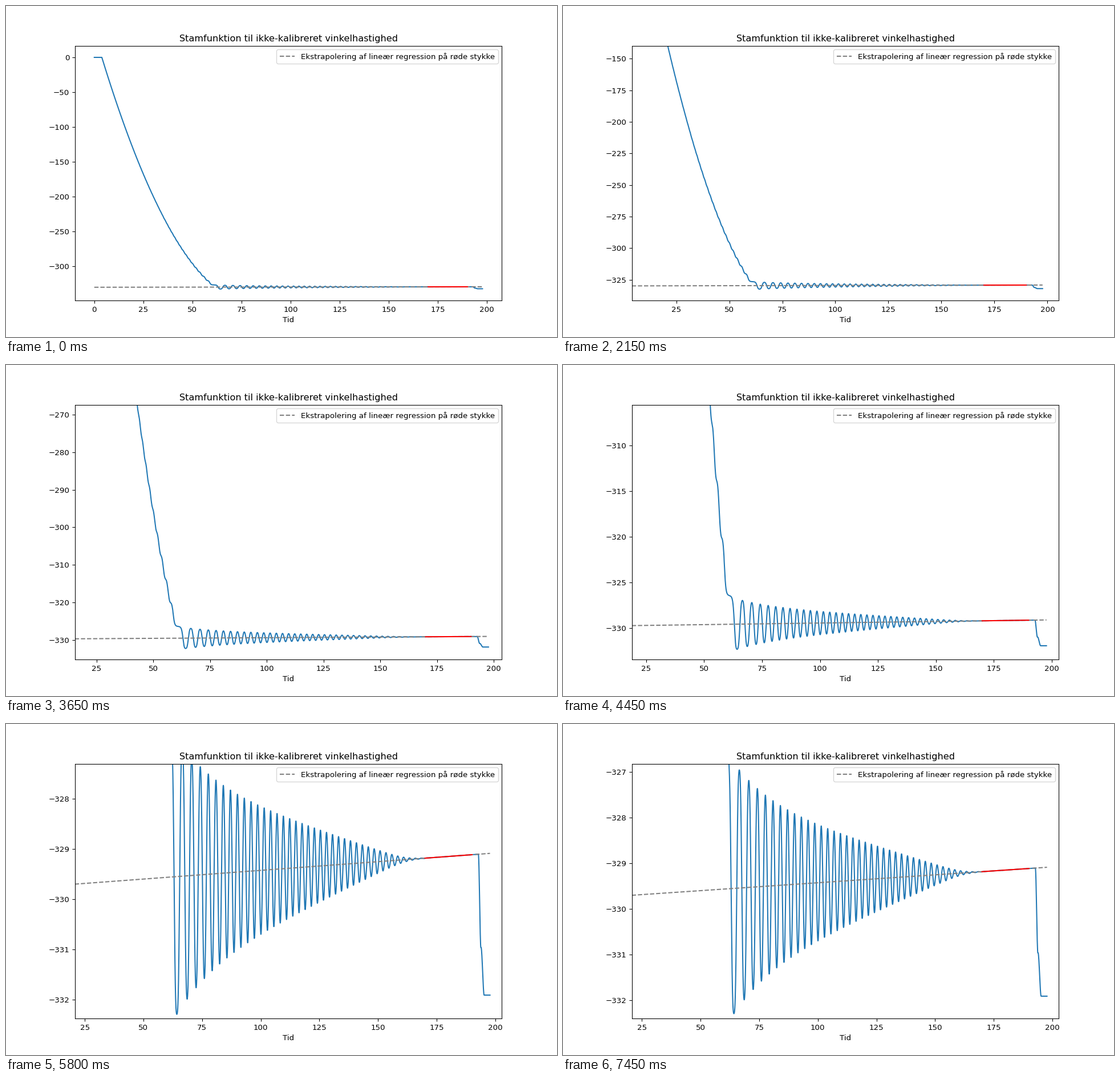
A matplotlib script for the animation above (8.25 s loop, 966 by 580 pixels).

```python
import numpy as np
import matplotlib.pyplot as plt
from matplotlib.animation import FuncAnimation

WIDTH, HEIGHT, DPI = 966, 580, 96.6
STEP_MS = 50
FRAMES = 165
LAST_MOVE = 149

RELEASE = 3.85       # wheel is let go
TURN_BACK = 64.3     # first reversal of direction
OMEGA = 2 * np.pi / 2.505  # small-swing angular frequency


def trend(t):
    return -329.773 + 0.00347 * t


def spin_down(t):
    """Wheel slowed by friction, with a wobble once per turn."""
    s = t - RELEASE
    mean = -(9.2 * s - 0.0604 * s ** 2)
    speed = 9.2 - 0.1208 * s
    wobble = np.minimum(0.8, 6.4 / speed ** 2)
    return mean - wobble * np.sin(mean + 326.4)


def slow_turn(tau):
    """One full turn that starts and ends at the unstable top point."""
    return 4 * np.arctan(np.exp(-OMEGA * tau))


def last_turn(t):
    return trend(t) - np.pi + slow_turn(t - 58.8) + slow_turn(t - 63.05)


def swing(t):
    """Large pendulum swings that die out, getting faster as they shrink."""
    left = 0.03 * np.log1p(np.exp((162 - t) / 3))
    amp = left * (1.91 + 0.0068 * np.exp(5 * left))
    slowing = ((1 + np.sqrt(np.cos(amp / 2))) / 2) ** 2
    phase = np.cumsum(OMEGA * slowing) * (t[1] - t[0])
    phase -= np.interp(TURN_BACK, t, phase) + np.pi
    # Third harmonic: flatter turning points, quicker passage in the middle.
    flat = (np.sinc(amp / (2 * np.pi)) / slowing - 1) / 4
    return trend(t) + amp * ((1 + flat) * np.cos(phase) - flat * np.cos(3 * phase))


def ramp(t, start, end):
    u = np.clip((t - start) / (end - start), 0, 1)
    return u * u * (3 - 2 * u)


def final_drop(t):
    return trend(192.8) - 1.86 * ramp(t, 192.75, 193.8) - 0.95 * ramp(t, 193.9, 195.2)


def smooth(x, keys):
    """Cubic Hermite curve through (x, y) key points."""
    kx, ky = np.array(keys, float).T
    slope = np.gradient(ky, kx, edge_order=2)
    i = np.clip(np.searchsorted(kx, x, side="right") - 1, 0, len(kx) - 2)
    h = kx[i + 1] - kx[i]
    u = (x - kx[i]) / h
    return (ky[i] * (1 + 2 * u) * (1 - u) ** 2
            + ky[i + 1] * u * u * (3 - 2 * u)
            + h * u * (1 - u) * (slope[i] * (1 - u) - slope[i + 1] * u))


t = np.linspace(0, 197.7, 4000)
angle = np.zeros_like(t)
for start, end, part in [(RELEASE, 58.6, spin_down), (58.6, 63.05, last_turn),
                         (63.05, 171, swing), (171, 192.75, trend),
                         (192.75, 198, final_drop)]:
    sel = (t >= start) & (t < end)
    angle[sel] = part(t[sel])

# A hair is added so that rounding down never loses a pixel.
fig, ax = plt.subplots(figsize=((WIDTH + 1e-3) / DPI, (HEIGHT + 1e-3) / DPI), dpi=DPI)
ax.plot(t, angle, color="tab:blue")
ax.plot(t, trend(t), "--", color="gray",
        label="Ekstrapolering af lineær regression på røde stykke")
fit = np.linspace(170, 190, 50)
ax.plot(fit, trend(fit), color="red")
ax.set_title("Stamfunktion til ikke-kalibreret vinkelhastighed")
ax.set_xlabel("Tid")
ax.legend(loc="upper right")

# Views as left, right, bottom, top.
WIDE = np.array([-9.885, 207.585, -348.91, 16.72])
CLOSE = np.array([20.85, 202.76, -332.35, -327.97])
ZOOM = [(0, 0), (43, 1.479), (73, 2.276), (105, 2.9077), (130, 3.1837),
        (LAST_MOVE, 3.2574)]


def update(frame):
    # The zoom angle runs slightly past pi, so the view eases back at the end.
    turn = smooth(min(frame, LAST_MOVE), ZOOM)
    left, right, bottom, top = WIDE + (1 - np.cos(turn)) / 2 * (CLOSE - WIDE)
    ax.set_xlim(left, right)
    ax.set_ylim(bottom, top)
    return []


anim = FuncAnimation(fig, update, frames=FRAMES, interval=STEP_MS,
                     repeat=True, repeat_delay=0, blit=False)
plt.show()
```
